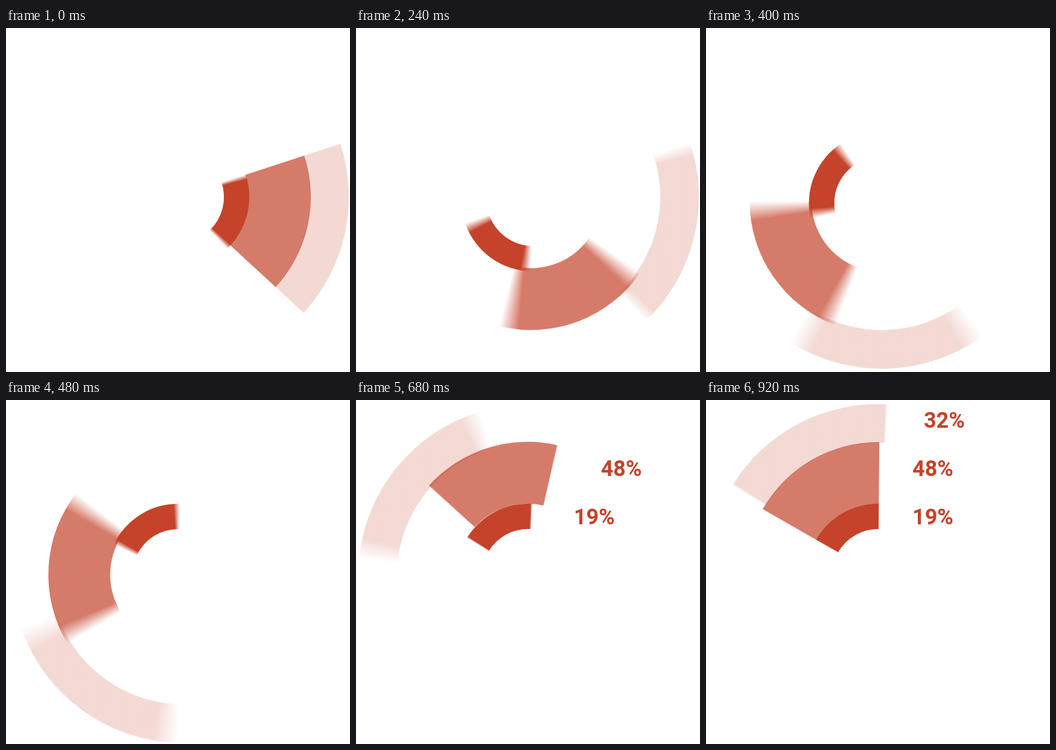
An HTML page with a canvas for the animation above (0.96 s loop, 570x570 px).

```html
<!DOCTYPE html>
<html lang="en">
<head>
<meta charset="utf-8">
<title>Radial segments</title>
<style>
  html, body { margin: 0; width: 100%; height: 100%; overflow: hidden; background: #fff; }
  canvas { display: block; width: 570px; height: 570px; }
</style>
</head>
<body>
<canvas id="stage"></canvas>
<script>
const SIZE = 570, LOOP = 960, STEP = 40, SHUTTER = 18;
const PIVOT = { x: 287.2, y: 285 };
const OFFSET = { x: -2.7, y: -5 };   // arc centre relative to the pivot
const START = -18.1, END = 42.6;     // wedge edges at rest, degrees
const RGB = '196,67,42';
const rad = deg => deg * Math.PI / 180;

// Rotation keys: [time, degrees, degrees per ms]
const sweep = [[-20, 0, 0], [0, 1.7, 0.25], [40, 19, 0.475], [320, 152, 0.475], [400, 189.7, 0.46]];
const swing = [...sweep, [480, 226, 0.27], [560, 240.3, 0.03], [600, 239.7, -0.04],
  [640, 234.8, -0.12], [680, 230.2, -0.08], [760, 227.9, 0]];
const softSwing = [...sweep, [480, 221.5, 0.3], [520, 229.8, 0.07], [580, 232, 0],
  [680, 230.2, -0.05], [760, 227.9, 0]];

const rings = [
  { r0: 219.5, r1: 283.5, alpha: 0.2, delay: 240, keys: softSwing, label: '32%', y: 46 },
  { r0: 118, r1: 220.5, alpha: 0.7, delay: 120, keys: swing, label: '48%', y: 126 },
  { r0: 76.5, r1: 118.5, alpha: 1, delay: 0, keys: swing, label: '19%', y: 206 }
];

const canvas = document.getElementById('stage');
const ctx = canvas.getContext('2d');
const ratio = window.devicePixelRatio || 1;
canvas.width = canvas.height = Math.round(SIZE * ratio);
ctx.scale(ratio, ratio);

// Cubic Hermite interpolation through the keys
function angleAt(keys, t) {
  const last = keys[keys.length - 1];
  if (t <= keys[0][0]) return keys[0][1];
  if (t >= last[0]) return last[1];
  const i = keys.findIndex(k => k[0] > t);
  const [ta, a, va] = keys[i - 1], [tb, b, vb] = keys[i];
  const d = tb - ta, u = (t - ta) / d, w = 1 - u;
  return a * (1 + 2 * u) * w * w + va * d * u * w * w
       + b * u * u * (3 - 2 * u) - vb * d * u * u * w;
}

function drawRing(ring, time) {
  const turn = angleAt(ring.keys, time);
  const blur = Math.abs(angleAt(ring.keys, time + SHUTTER / 2) - angleAt(ring.keys, time - SHUTTER / 2));
  const c = Math.cos(rad(turn)), s = Math.sin(rad(turn));
  const x = PIVOT.x + OFFSET.x * c - OFFSET.y * s;
  const y = PIVOT.y + OFFSET.x * s + OFFSET.y * c;
  const from = START + turn - blur / 2, to = END + turn + blur / 2;
  const solid = `rgba(${RGB},${ring.alpha})`, clear = `rgba(${RGB},0)`;

  if (blur < 0.15) {
    ctx.fillStyle = solid;
  } else {
    const fade = ctx.createConicGradient(rad(from), x, y);
    fade.addColorStop(0, clear);
    fade.addColorStop(blur / 360, solid);
    fade.addColorStop((END - START) / 360, solid);
    fade.addColorStop((to - from) / 360, clear);
    ctx.fillStyle = fade;
  }
  ctx.beginPath();
  ctx.arc(x, y, ring.r1, rad(from), rad(to));
  ctx.arc(x, y, ring.r0, rad(to), rad(from), true);
  ctx.closePath();
  ctx.fill();
}

function drawLabel(ring, time) {
  if (time <= 480) return;
  let shift;
  if (time < 556) {
    shift = -28 + 92 * (time - 480) / 76;
  } else {
    const u = Math.min(1, (time - 552) / 200);
    shift = 64 * (1 - u * u * (3 - 2 * u));
  }
  ctx.fillStyle = `rgba(${RGB},${Math.min(1, (time - 480) / 80)})`;
  ctx.fillText(ring.label, 342 + shift, ring.y);
}

function draw(t) {
  ctx.fillStyle = '#fff';
  ctx.fillRect(0, 0, SIZE, SIZE);
  ctx.font = '700 36px Roboto, sans-serif';
  for (const ring of rings) {
    drawRing(ring, t - ring.delay);
    drawLabel(ring, t - ring.delay);
  }
}

let origin = null;
function tick(now) {
  if (origin === null) origin = now;
  const t = Math.max(0, now - origin) % LOOP;
  draw(Math.floor(t / STEP) * STEP);
  requestAnimationFrame(tick);
}
draw(0);
requestAnimationFrame(tick);
</script>
</body>
</html>
```
